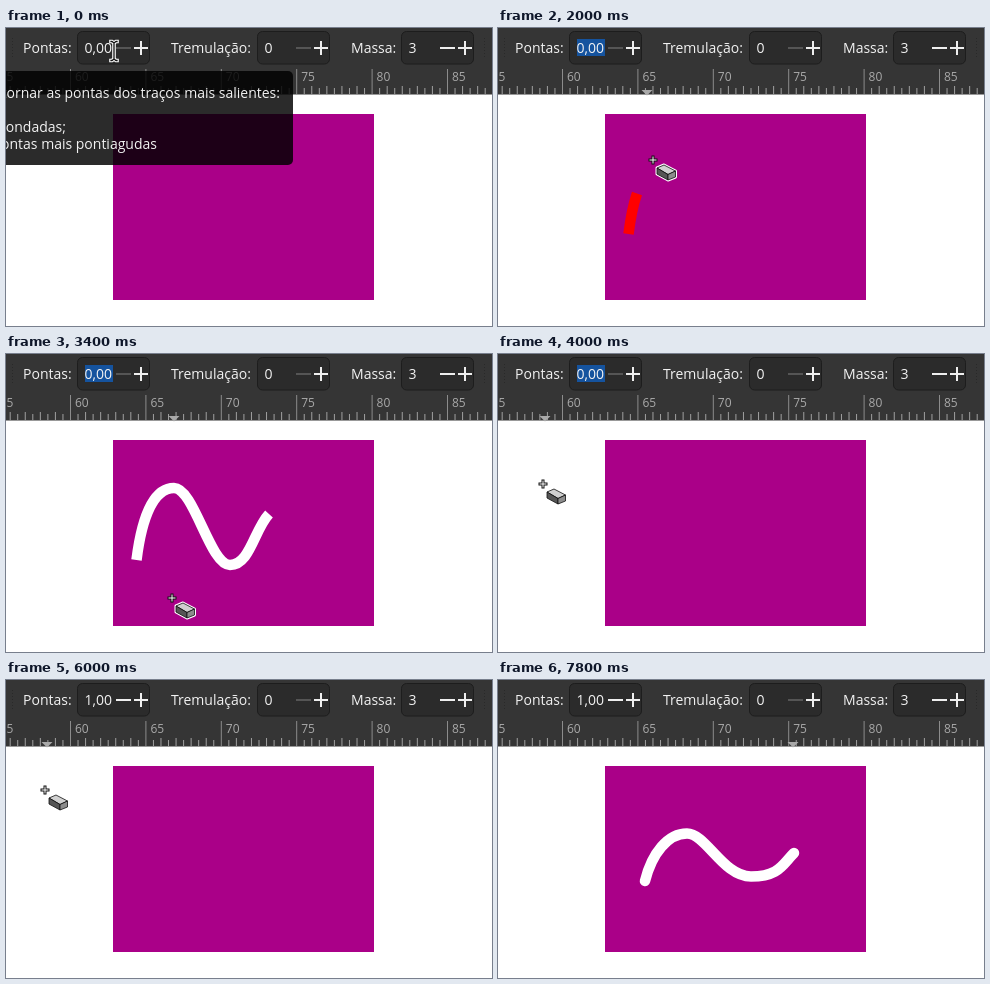
Write an HTML page that moves like this. It is 486 by 298 pixels and loops after 8 s.

```html
<!DOCTYPE html>
<html lang="pt">
<head>
<meta charset="utf-8">
<style>
  html, body { margin: 0; width: 100%; height: 100%; overflow: hidden; background: #fff; }
  svg { display: block; width: 486px; height: 298px; }
  text { font: 14px "Open Sans", "Noto Sans", sans-serif; fill: #f2f2f2; white-space: pre; }
  .ruler text { font-size: 12px; fill: #a9a9a9; }
  .field { fill: #2b2b2b; stroke: #1d1d1d; }
  .field.focus { stroke: #15539e; stroke-width: 2; }
  .sign { stroke: #eee; stroke-width: 2; }
  .sign.off { stroke: #555; }
  .stroke { fill: none; stroke-width: 10.5; }
</style>
</head>
<body>
<svg viewBox="0 0 486 298">
  <rect x="107" y="86" width="261" height="186" fill="#a08"/>
  <path class="stroke" id="sharp" pathLength="1"
    d="M130.5 206C136 162 148 134 168 134S204 211 224 211S248 176 263 160"/>
  <path class="stroke" id="round" pathLength="1" stroke-linecap="round"
    d="M147 201C154 173 170 153.5 189 153.5S225 196.500 253 196.500S284 185 296 173"/>
  <rect width="486" height="66.5" fill="#353535"/>
  <path d="M6.5 10V31M478.5 10V31" stroke="#292929" stroke-dasharray="1 2"/>
  <g class="ruler" id="ruler"></g>
  <path id="marker" d="M-5.5 62h11l-5.5 5.5Z" fill="#a9a9a9"/>
  <g id="bar"></g>
  <g id="tip">
    <rect x="-10" y="43" width="297" height="94" rx="5" fill="#000" fill-opacity=".83"/>
    <g text-anchor="end">
      <text x="274" y="70">tornar as pontas dos traços mais salientes:</text>
      <text x="60" y="104">arredondadas;</text>
      <text x="151" y="121">pontas mais pontiagudas</text>
    </g>
  </g>
  <g id="beam" fill="none" stroke-linecap="square">
    <path id="beamShape" d="M-3-9.5h1L0-8L2-9.5h1M0-8V8M-3 9.5h1L0 8L2 9.5h1" stroke="#fff" stroke-width="3.6"/>
    <use href="#beamShape" style="display:none"/>
  </g>
  <g id="eraser" stroke-linejoin="round">
    <path d="M-4.500 0h9M0-4.500v9" stroke="#111" stroke-width="3"/>
    <path d="M-3.500 0h7M0-3.500v7" stroke="#fff"/>
    <path d="M4 8l7-3l11.5 6v6l-7.5 3l-11-6Z" fill="#222" stroke="#fff" stroke-width="3"/>
    <g stroke="#111" stroke-width=".8">
      <path d="M4 8l7-3l11.5 6l-7.5 3.5Z" fill="#d0d0d0"/>
      <path d="M4 8l11 6.5V20l-11-6Z" fill="#555"/>
      <path d="M15 14.5l7.5-3.5v6L15 20Z" fill="#8c8c8c"/>
    </g>
  </g>
</svg>
<script>
const LOOP = 8000, STEP = 200;
const $ = id => document.getElementById(id);

// pointer keys: ms, x, y
const moves = [
  [0, 108, 23], [600, 108, 23], [1000, 79, 23], [1200, 79, 23],
  [1400, 88, 100], [1800, 130, 206], [2000, 155, 132], [2200, 178, 137],
  [2600, 222, 212], [3000, 270, 153], [3400, 166, 244], [3600, 113, 238],
  [4000, 45, 130], [4400, 79, 72], [4600, 85, 28], [5000, 102, 23],
  [5600, 102, 23], [5800, 62, 80], [6000, 39, 110], [6400, 147, 201],
  [6600, 153, 182], [6800, 211, 160], [7200, 258, 194], [7600, 314, 160]
];

function pointer(t) {
  const i = moves.findLastIndex(m => m[0] <= Math.max(t, 0));
  const a = moves[i], b = moves[i + 1] || a;
  const k = b === a ? 0 : (t - a[0]) / (b[0] - a[0]);
  return { x: a[1] + (b[1] - a[1]) * k, y: a[2] + (b[2] - a[2]) * k };
}

function markerAt(t, x, y) {
  if (y < 40) return 79;
  return Math.min(295, x < pointer(t - STEP).x ? x + 2 : x - 6);
}

const sharpShare = t => t < 4000 ? Math.min(1, (t - 1800) / 1220) : 0;
const roundShare = t => t < 6800 ? (t - 6560) / 800
  : t < 7800 ? .33 + (t - 6800) / 1250 : 1;

function buildRuler() {
  let out = "";
  for (let i = -10; i < 60; i++) {
    const x = 64.5 + i * 7.54;
    const major = i % 10 === 0;
    const top = major ? 41 : i % 2 ? 60 : 58;
    out += `<path d="M${x} ${top}V66" stroke="${major ? "#8c8c8c" : "#a0a0a0"}"/>`;
    if (major) out += `<text x="${x + 4.5}" y="53">${60 + i / 2}</text>`;
  }
  $("ruler").innerHTML = out;
}

function field(id, label, labelX, x, value, minus) {
  return `<text x="${labelX}" y="25">${label}</text>
    <rect class="field" id="${id}" x="${x + .5}" y="3.5" width="72" height="32.5" rx="5"/>
    <rect id="${id}Sel" y="11" height="17" fill="#15539e"/>
    <text id="${id}Val" x="${x + 7.5}" y="25">${value}</text>
    <path class="sign ${minus ? "" : "off"}" id="${id}Minus" d="M${x + 39} 20h15"/>
    <path class="sign" d="M${x + 57} 20h14m-7-7v14"/>`;
}

function show(el, on) {
  el.style.display = on ? "" : "none";
}

function place(el, on, x, y) {
  show(el, on);
  el.setAttribute("transform", `translate(${x} ${y})`);
}

function drawStroke(el, on, share) {
  show(el, on && share > 0);
  el.setAttribute("stroke", share === 1 ? "#fff" : "#f00");
  el.setAttribute("stroke-dasharray", share === 1 ? "none" : `${share} 2`);
}

function render(t) {
  const { x, y } = pointer(t);
  const inField = y < 40;
  place($("beam"), inField, x, y);
  place($("eraser"), !inField && t < 7800, x, y);
  place($("marker"), true, markerAt(t, x, y), 0);
  drawStroke($("sharp"), t < 5000, sharpShare(t));
  drawStroke($("round"), t > 5000, roundShare(t));
  show($("tip"), t < 600);

  const focus = (t >= 600 && t < 1800) || (t >= 4600 && t < 5800);
  $("caps").classList.toggle("focus", focus);
  $("capsVal").textContent = t < 5600 ? "0,00" : t < 5800 ? "1" : "1,00";
  $("capsMinus").classList.toggle("off", t < 5800);
  const from = t < 1000 ? 95 : 79;
  $("capsSel").setAttribute("x", from);
  $("capsSel").setAttribute("width", t >= 800 && t < 5600 ? 107 - from : 0);
}

function buildBeam() {
  const core = $("beamShape").cloneNode();
  core.removeAttribute("id");
  core.setAttribute("stroke", "#111");
  core.setAttribute("stroke-width", 1.3);
  $("beam").replaceChildren($("beamShape"), core);
}

buildRuler();
buildBeam();
$("bar").innerHTML =
  field("caps", "Pontas:", 17, 71, "0,00", false) +
  field("tremor", "Tremulação:", 165, 251, "0", false) +
  field("mass", "Massa:", 345, 395, "3", true);

const begin = performance.now();
function tick() {
  const t = (performance.now() - begin) % LOOP;
  render(Math.floor(t / STEP) * STEP);
  requestAnimationFrame(tick);
}
tick();
</script>
</body>
</html>
```
